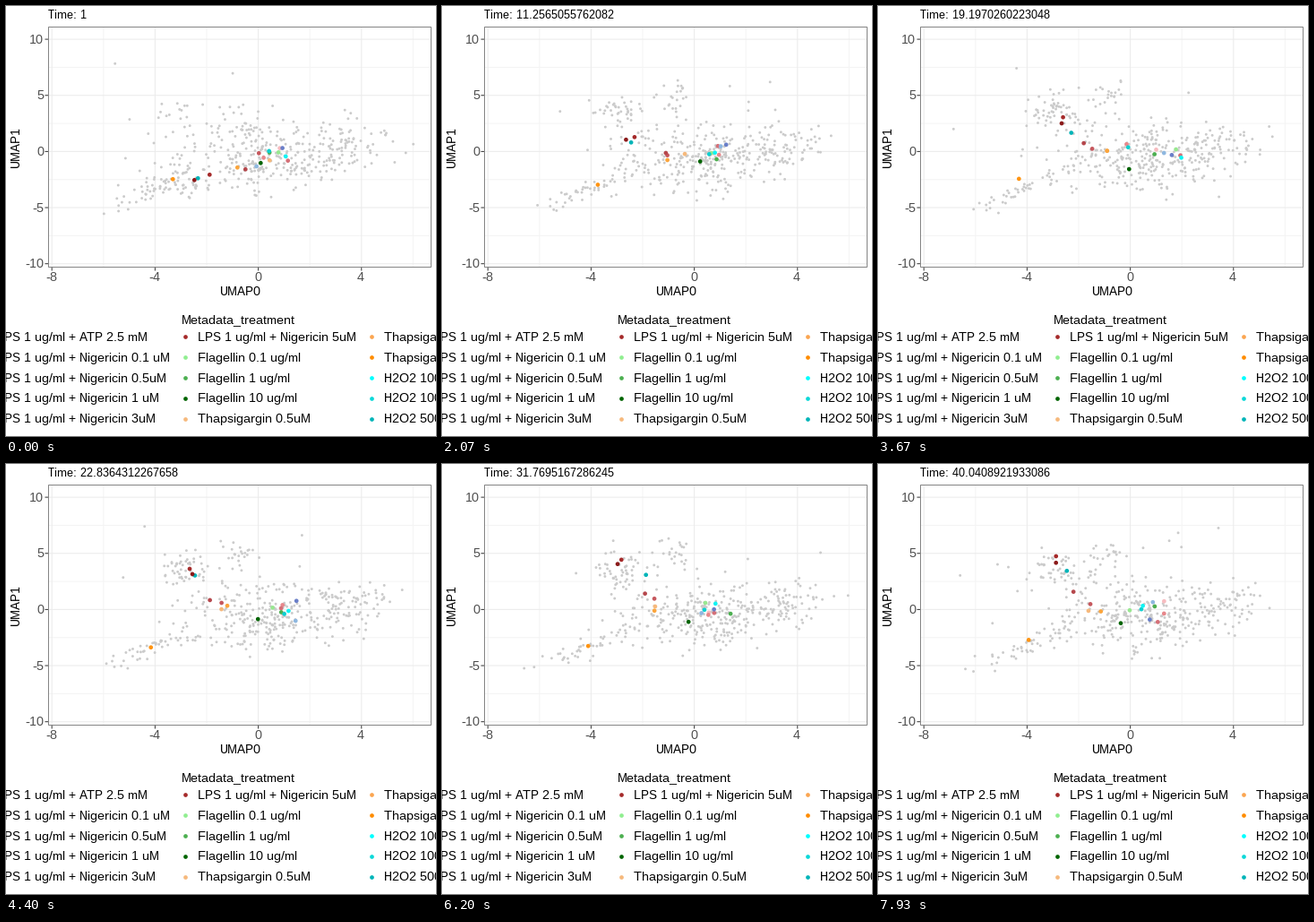
Recreate the animation shown at these times as a matplotlib script. Size 480 by 480 pixels, loop 8 s.

```python
import numpy as np
import matplotlib.pyplot as plt
from matplotlib.animation import FuncAnimation
from matplotlib.patches import Rectangle

plt.rcParams["font.family"] = "Liberation Sans"
plt.rcParams["text.hinting"] = "native"
plt.rcParams["text.hinting_factor"] = 1

W = H = 480
DPI = 100
PX = 72 / DPI
FRAMES = 120
STEP = 89 / 269                      # simulated time per frame
TIMES = np.arange(1, 43)             # whole-number states, joined linearly
GREY = "#cbcbcb"
DOT, SPECK = 4.7, 2.9                # diameters in pixels
rng = np.random.default_rng(5)

# Treatments that wander off: start and end in pixels
DRIFT = {
    "#f6b97c": [(294, 172), (242, 161)],
    "#006400": [(284, 175), (273, 175)],
    "#fba53c": [(258, 180), (246, 161)],
    "#c6585e": [(282, 164), (231, 156)],
    "#b5474c": [(267, 182), (219, 148)],
    "#ff9412": [(186, 193), (161, 198)],
    "#00b4b8": [(214, 192), (219, 119)],
    "#8b1a1a": [(210, 194), (197, 111)],
    "#a52a2a": [(227, 188), (202, 105)],
}
# Treatments that stay inside the main cloud
CORE = ["#f7bcc0", "#e8888c", "#d57078", "#98e890", "#4caf50",
        "#8fb8e0", "#6a7fc8", "#0cd0d0", "#10f4f4"]

# Grey clusters: count, start, end, spread, slope
CLUSTERS = [
    (205, (298, 170), (298, 170), (36, 20), 0),
    (85, (378, 160), (378, 160), (27, 14), -0.15),
    (36, (228, 178), (228, 172), (26, 16), 0),
    (42, (162, 204), (162, 204), (30, 6), -0.38),
    (18, (200, 122), (198, 116), (20, 11), 0),
    (32, (190, 197), (197, 119), (16, 11), 0),
    (22, (264, 132), (255, 103), (10, 11), 0),
    (24, (260, 135), (260, 135), (95, 34), 0),
]


def noise(*shape):
    return np.clip(rng.normal(size=shape), -2.2, 2.2)


def cluster(count, start, end, spread, slope):
    """Scattered points that leave start one by one for end."""
    delay = rng.uniform(0, 11, (count, 1))
    u = np.clip((TIMES - 1 - delay) / 4, 0, 1)[..., None]
    off = 0.75 * noise(count, 1, 2) + 0.7 * noise(count, len(TIMES), 2)
    off = off * spread
    off[..., 1] += slope * off[..., 0]
    pos = np.array(start) * (1 - u) + np.array(end) * u + off
    return np.clip(pos, (84, 64), (455, 232))


def drift(start, end):
    """Eased path from start to end with jitter growing from zero."""
    s = (TIMES[:, None] - 1) / (TIMES[-1] - 1)
    u = 1 - (1 - s) ** 2.5
    jitter = noise(len(TIMES), 2) * (6, 4) * np.minimum(1, 8 * s)
    return np.array(start) * (1 - u) + np.array(end) * u + jitter


def hover():
    return (308, 164) + noise(1, 2) * (5, 2) + noise(len(TIMES), 2) * (14, 6)


specks = [k for c in CLUSTERS for k in cluster(*c)]
KEYS = np.array(specks + [hover() for _ in CORE]
                + [drift(*path) for path in DRIFT.values()])
COLORS = [GREY] * len(specks) + CORE + list(DRIFT)
SIZES = [((SPECK if c == GREY else DOT) * PX) ** 2 for c in COLORS]


def positions(t):
    i, f = int(t) - 1, t % 1
    return KEYS[:, i] * (1 - f) + KEYS[:, i + 1] * f + 0.3


fig = plt.figure(figsize=(W / DPI, H / DPI), dpi=DPI, facecolor="white")
ax = fig.add_axes([0, 0, 1, 1])
ax.set_xlim(0, W)
ax.set_ylim(H, 0)
ax.axis("off")

LEFT, RIGHT, TOP, BOTTOM = 47.5, 474.5, 23.5, 291.5


def sx(u):
    return 281.6 + 28.8 * u


def sy(v):
    return 162.4 - 12.53 * v


def line(xs, ys, color):
    ax.plot(xs, ys, color=color, lw=PX, zorder=1, solid_capstyle="butt", snap=False)


def vline(u, color):
    line([sx(u)] * 2, [TOP, BOTTOM], color)


def hline(v, color):
    line([LEFT, RIGHT], [sy(v)] * 2, color)


def text(x, y, s, size=14, color="black", **kw):
    return ax.text(x, y, s, fontsize=size * PX, color=color, va="baseline", **kw)


for u in (-6, -2, 2, 6):
    vline(u, "#f4f4f4")
for v in (-7.5, -2.5, 2.5, 7.5):
    hline(v, "#f4f4f4")
for u in (-8, -4, 0, 4):
    vline(u, "#ebebeb")
    line([sx(u)] * 2, [BOTTOM, BOTTOM + 4], "#333333")
    text(round(sx(u) - 0.4), 307, str(u), color="#4d4d4d", ha="center")
for v in (-10, -5, 0, 5, 10):
    hline(v, "#ebebeb")
    line([LEFT - 4, LEFT], [sy(v)] * 2, "#333333")
    text(42, round(sy(v) - 0.4) + 5, str(v), color="#4d4d4d", ha="right")

ax.add_patch(Rectangle((LEFT, TOP), RIGHT - LEFT, BOTTOM - TOP, fill=False,
                       ec="#858585", lw=PX, zorder=5, snap=False))
text(261, 323, "UMAP0", ha="center")
text(15, 158, "UMAP1", ha="center", rotation=90, rotation_mode="anchor")


def legend(x, labels, colors=()):
    for k, label in enumerate(labels):
        text(x, round(374.1 + 22.75 * k), label, clip_on=True)
    for k, color in enumerate(colors):
        ax.scatter([x - 14], [369.4 + 22.8 * k], s=(DOT * PX) ** 2,
                   c=[color], linewidths=0)


LPS = "LPS 1 ug/ml + "
text(196, 354, "Metadata_treatment")
legend(-10, [LPS + "ATP 2.5 mM"] + [LPS + "Nigericin " + dose for dose in
                                    ("0.1 uM", "0.5uM", "1 uM", "3uM")])
legend(214, [LPS + "Nigericin 5uM", "Flagellin 0.1 ug/ml", "Flagellin 1 ug/ml",
             "Flagellin 10 ug/ml", "Thapsigargin 0.5uM"],
       ["#a52a2a", "#90ee90", "#4caf50", "#006400", "#f6b97c"])
legend(422, ["Thapsigargin 1 uM", "Thapsigargin 10 uM",
             "H2O2 100 nM", "H2O2 100 uM", "H2O2 500 uM"],
       ["#fba550", "#ff8c00", "#00ffff", "#0cd8d8", "#00b4b8"])

title = text(47, 14, "", size=13)
dots = ax.scatter(*positions(1).T, s=SIZES, c=COLORS, linewidths=0, zorder=3)


def draw(frame):
    t = 1 + STEP * frame
    title.set_text(f"Time: {t:.15g}")
    dots.set_offsets(positions(t))
    return title, dots


anim = FuncAnimation(fig, draw, frames=FRAMES, interval=8000 / FRAMES,
                     init_func=lambda: draw(0), repeat=True, repeat_delay=0)
plt.show()
```
